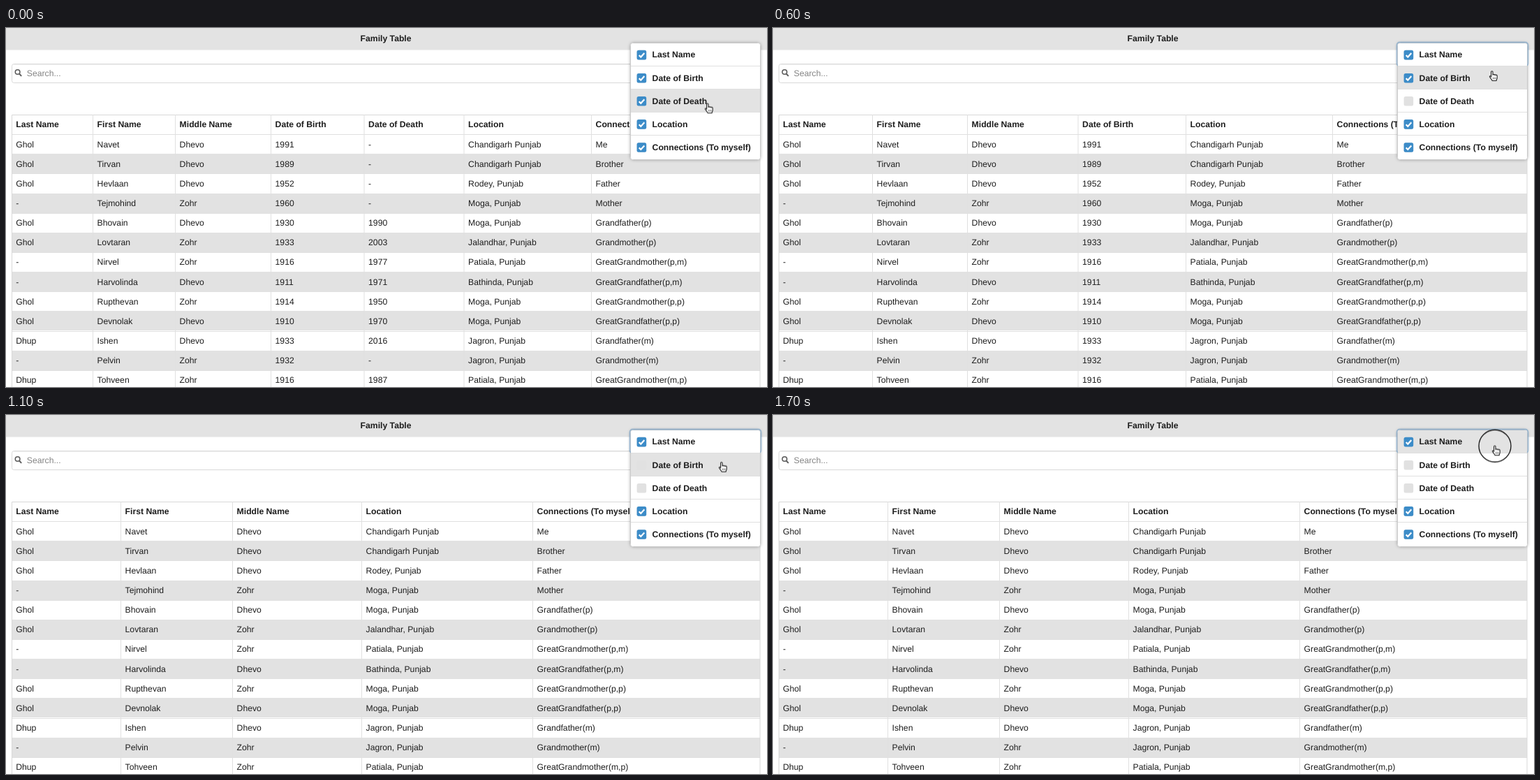
Write an HTML page that moves like this. It is 1090x514 px and loops after 1.8 s.

```html
<!DOCTYPE html>
<html lang="en">
<head>
<meta charset="utf-8">
<title>Family Table</title>
<style>
html, body { margin: 0; width: 100%; height: 100%; overflow: hidden; background: #fff; }
svg { display: block; }
text { font: 12.2px "Liberation Sans", Arial, sans-serif; fill: #1e1e1e; text-rendering: geometricPrecision; }
.bold { font-weight: 700; fill: #1e1e1e; }
.hint { fill: #858585; }
.line { stroke: #e0e0e0; fill: none; }
.table, .tick, .hover, .focus, .hand, .ring { animation: 1.8s step-end infinite; }

/* Columns disappear one after another */
.all { animation-name: first; }
.no-death { animation-name: middle; }
.no-birth { animation-name: last; }
.death { animation-name: first; }
.birth { animation-name: untilLast; }
@keyframes first { 0% { visibility: visible; } 27.77%, 100% { visibility: hidden; } }
@keyframes middle { 0% { visibility: hidden; } 27.77% { visibility: visible; } 61.11%, 100% { visibility: hidden; } }
@keyframes last { 0% { visibility: hidden; } 61.11%, 100% { visibility: visible; } }
@keyframes untilLast { 0% { visibility: visible; } 61.11%, 100% { visibility: hidden; } }

/* Pointer, hovered row and click ring */
.hover { animation-name: hover; }
@keyframes hover {
  0% { transform: translateY(88px); }
  33.33% { transform: translateY(55px); }
  72.22%, 100% { transform: translateY(22px); }
}
.hand { animation-name: hand; }
@keyframes hand {
  0% { transform: translate(1005px, 108.3px); }
  5.55% { transform: translate(1003.7px, 107.7px); }
  33.33% { transform: translate(1030px, 62px); }
  38.88% { transform: translate(1029px, 63.5px); }
  44.44% { transform: translate(1026px, 66.5px); }
  50% { transform: translate(1025px, 67.8px); }
  66.66% { transform: translate(1027px, 61px); }
  72.22% { transform: translate(1033px, 46px); }
  77.77%, 100% { transform: translate(1034px, 44.3px); }
}
.ring { animation-name: ring; }
@keyframes ring {
  0% { visibility: hidden; }
  22.22% { visibility: visible; }
  27.77% { visibility: hidden; }
  55.55% { visibility: visible; }
  61.11% { visibility: hidden; }
  94.44%, 100% { visibility: visible; }
}
.focus { animation-name: focus; }
@keyframes focus { 0% { visibility: hidden; } 5.55%, 100% { visibility: visible; } }
</style>
</head>
<body>
<svg id="stage" width="1090" height="514" viewBox="0 0 1090 514"></svg>
<script>
const heads = ["Last Name", "First Name", "Middle Name", "Date of Birth", "Date of Death", "Location", "Connections (To myself)"];
const people = `Ghol|Navet|Dhevo|1991|-|Chandigarh Punjab|Me
Ghol|Tirvan|Dhevo|1989|-|Chandigarh Punjab|Brother
Ghol|Hevlaan|Dhevo|1952|-|Rodey, Punjab|Father
-|Tejmohind|Zohr|1960|-|Moga, Punjab|Mother
Ghol|Bhovain|Dhevo|1930|1990|Moga, Punjab|Grandfather(p)
Ghol|Lovtaran|Zohr|1933|2003|Jalandhar, Punjab|Grandmother(p)
-|Nirvel|Zohr|1916|1977|Patiala, Punjab|GreatGrandmother(p,m)
-|Harvolinda|Dhevo|1911|1971|Bathinda, Punjab|GreatGrandfather(p,m)
Ghol|Rupthevan|Zohr|1914|1950|Moga, Punjab|GreatGrandmother(p,p)
Ghol|Devnolak|Dhevo|1910|1970|Moga, Punjab|GreatGrandfather(p,p)
Dhup|Ishen|Dhevo|1933|2016|Jagron, Punjab|Grandfather(m)
-|Pelvin|Zohr|1932|-|Jagron, Punjab|Grandmother(m)
Dhup|Tohveen|Zohr|1916|1987|Patiala, Punjab|GreatGrandmother(m,p)`.split("\n").map(row => row.split("|"));

const top0 = 124, rowH = 28.14;
const rect = (x, y, w, h, attrs) => `<rect x="${x}" y="${y}" width="${w}" height="${h}" ${attrs}/>`;
const path = (d, attrs = 'class="line"') => `<path d="${d}" ${attrs}/>`;
const text = (x, y, str, cls = "") => `<text x="${x}" y="${y}" class="${cls}">${str}</text>`;

function stripes() {
  let out = "";
  for (let i = 1; i <= people.length; i++) {
    const y = Math.round(top0 + i * rowH);
    out += i % 2 ? path(`M8 ${y + .5}H1080`) : rect(8, y, 1072, 28, 'fill="#e2e2e2"');
  }
  return out + path("M8.5 514V124.5H1080V514", 'fill="none" stroke="#d8d8d8"');
}

function table(cls, cols, edges) {
  let out = "";
  cols.forEach((col, i) => {
    const x = edges[i];
    if (i) out += path(`M${x + .5} 124V514`);
    [heads, ...people].forEach((row, r) => {
      out += text(x + 6.6, (142.4 + r * rowH).toFixed(1), row[col], r ? "" : "bold");
    });
  });
  return `<g class="table ${cls}">${out}</g>`;
}

function menu() {
  const items = [0, 3, 4, 5, 6];
  let out = rect(894.5, 21.5, 186, 167, 'rx="4" fill="#fff" stroke="#cacaca" filter="url(#shadow)"');
  out += rect(893.5, 20.5, 188, 34, 'rx="4" class="focus" fill="none" stroke="#6d9fcb" stroke-width="1.8" opacity=".55" filter="url(#glow)"');
  out += rect(895, 22, 185, 166, 'rx="3" fill="#fff"');
  out += rect(895, 0, 185, 33, 'class="hover" fill="#e3e3e3"');
  items.forEach((col, i) => {
    const mid = 38.4 + i * 33.1, y = mid - 6.6;
    if (i) out += path(`M895 ${Math.round(22 + i * 33.1) - .5}H1080`);
    const cls = col === 3 ? "tick birth" : col === 4 ? "tick death" : "";
    out += rect(903.6, y, 13.6, 13.6, 'rx="2.5" fill="#e1e1e1"');
    out += `<g class="${cls}">` + rect(903.6, y, 13.6, 13.6, 'rx="2.5" fill="#3c8cc8"')
      + path(`M906.7 ${mid + .6}l2.6 2.6 5-5.6`, 'fill="none" stroke="#fff" stroke-width="2.2"') + "</g>";
    out += text(925.6, mid + 4, heads[col], "bold");
  });
  return out;
}

const pointer = `<circle class="ring" r="23" fill="none" stroke="#111" stroke-width="1.3"/>`
  + path("M-1.4 8.2V1a1.2 1.2 0 0 1 2.4 0v4.2a1.1 1.1 0 0 1 2.2.2a1.1 1.1 0 0 1 2.1.4a1 1 0 0 1 1.9.6v3c0 1.6-1 2-1.1 4.1h-6c-.2-1.6-2.6-3.4-3.6-5.4c-.5-1.2.9-1.9 1.7-.9z",
    'fill="#fff" stroke="#222" stroke-width="1.1" stroke-linejoin="round"')
  + path("M1.4 8.6v3M3.2 8.6v3M5 8.6v3", 'stroke="#444" stroke-width=".7"');

document.getElementById("stage").innerHTML = `<defs>
  <filter id="shadow" x="-10%" y="-10%" width="120%" height="120%"><feDropShadow dx="0" dy="0" stdDeviation="2.2" flood-color="#000" flood-opacity=".3"/></filter>
  <filter id="glow" x="-10%" y="-40%" width="120%" height="180%"><feGaussianBlur stdDeviation=".7"/></filter>
  </defs>`
  + rect(0, 0, 1090, 514, 'fill="#fff"')
  + rect(0, 0, 1090, 31.5, 'fill="#e3e3e3"')
  + text(507.6, 19, "Family Table", "bold")
  + rect(8.5, 51.5, 1072, 27, 'rx="3" fill="#fff" stroke="#d9d9d9"')
  + path("M10 52.5H1079", 'stroke="#f0f0f0"')
  + `<circle cx="16.6" cy="63" r="3.3" fill="none" stroke="#5c5c5c" stroke-width="1.6"/>`
  + path("M19 65.5l3.2 3.4", 'stroke="#5c5c5c" stroke-width="1.9"')
  + text(29.8, 68.5, "Search...", "hint")
  + stripes()
  + table("all", [0, 1, 2, 3, 4, 5, 6], [7.6, 124, 242, 379, 512.5, 655.5, 838])
  + table("no-death", [0, 1, 2, 3, 5, 6], [7.6, 142, 278, 436.5, 591, 801])
  + table("no-birth", [0, 1, 2, 5, 6], [7.6, 164, 324, 509, 754])
  + menu()
  + `<g class="hand">${pointer}</g>`;
</script>
</body>
</html>
```
